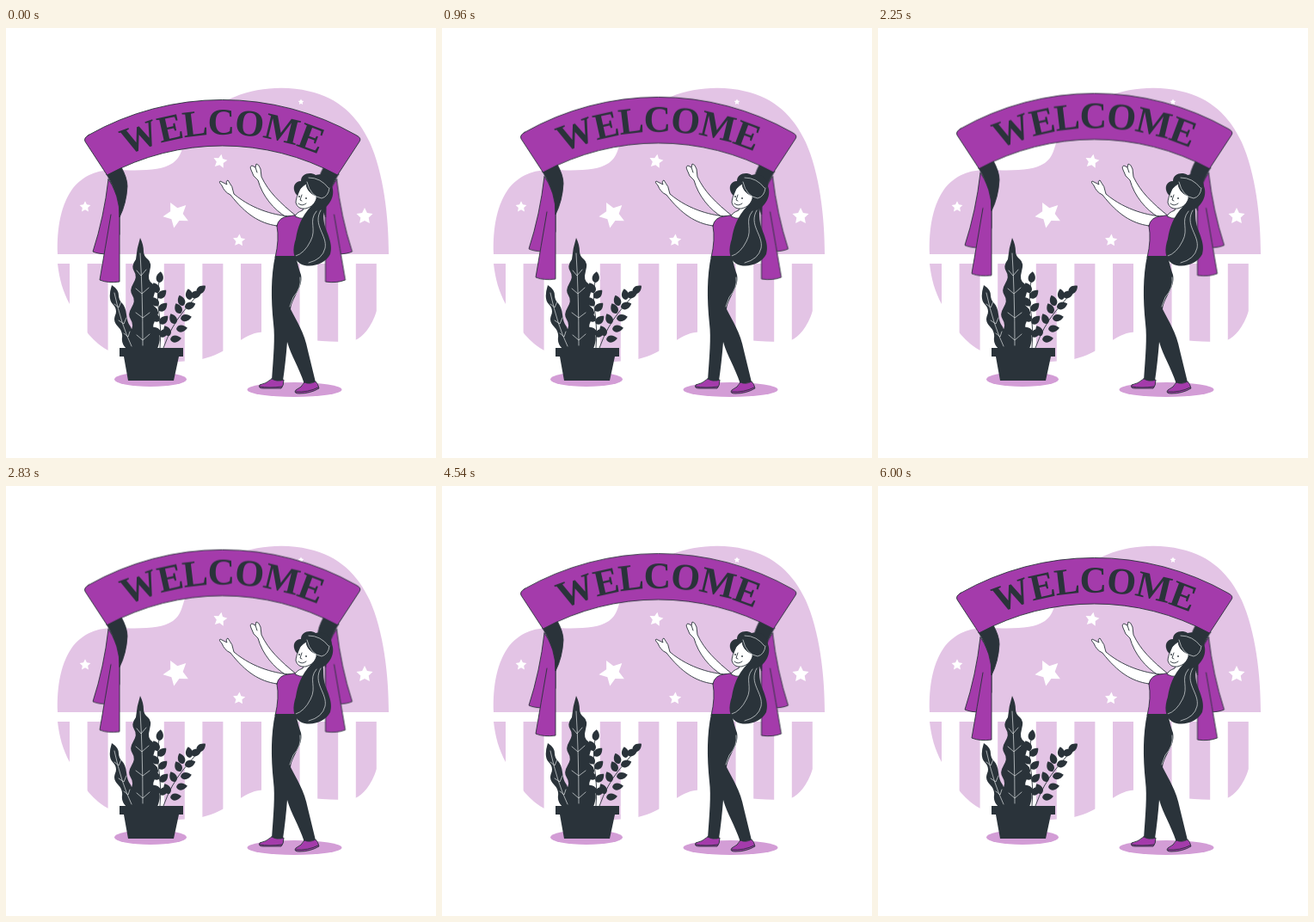
These frames come from a looping animation (500 by 500 pixels, 6.04 s). An HTML page without scripts:

```html
<!DOCTYPE html>
<html lang="en">
<head>
<meta charset="utf-8">
<title>Welcome</title>
<style>
  html, body { margin: 0; width: 100%; height: 100%; overflow: hidden; background: #fff; }
  svg { display: block; width: 100vw; height: 100vh; }
  .pale { fill: #e3c4e5; }
  .shade { fill: #d39dd6; }
  .dark { fill: #2a333a; }
  .plum { fill: #a43bab; }
  .skin { fill: #fff; }
  .ink { stroke: #2a333a; stroke-width: .9; stroke-linejoin: round; stroke-linecap: round; }
  .line { fill: none; }
  .vein { fill: none; stroke: #dfe2e4; stroke-width: .7; stroke-linecap: round; }
  .title { font: bold 43.5px "Liberation Serif", "Times New Roman", serif; letter-spacing: -1.1px; text-anchor: middle; fill: #2a333a; }
  .float { animation: float 6.04s linear infinite; }
  @keyframes float {
    0%, 99.5% { transform: translateY(0); }
    49.7% { transform: translateY(-10px); }
  }
</style>
</head>
<body>
<svg viewBox="0 0 500 500">
  <defs>
    <path id="star" d="M0-10 2.9-4 9.5-3.1 4.7 1.5 5.9 8.1 0 5-5.9 8.1-4.7 1.5-9.5-3.1-2.9-4Z" fill="#fff"/>
    <path id="leaf" class="dark" d="M0 0C-6-2-5-9 0-13C5-9 6-2 0 0Z"/>
    <path id="base" d="M102 169A275 275 0 0 1 404 169"/>
    <clipPath id="low">
      <path d="M60 274C62 292 66 306 74 321C82 338 92 354 107 367C130 387 180 393 228 385C258 378 268 362 289 355C312 350 330 359 348 362C372 365 392 366 406 363C415 359 425 348 431 329V274Z"/>
    </clipPath>
    <g id="drape">
      <path class="plum ink" d="M119 176Q114 220 101 260Q107 263 120 263L132 240V205Q128 188 119 176Z"/>
      <path class="plum ink" d="M122 217Q115 258 109 293Q119 297 132 295V205"/>
      <path class="dark ink" d="M117 170L133 160Q141 174 141 184Q140 204 132 220Q133 196 117 170Z"/>
    </g>
  </defs>

  <!-- backdrop -->
  <path class="pale" d="M60 263C59 232 64 205 78 186C91 171 105 165 127 165C160 166 180 166 194 157C208 147 203 133 216 117C228 101 246 87 266 80C292 69 326 67 352 73.500C387 81 409 103 423 133C439 169 445 219 445 263Z"/>
  <g clip-path="url(#low)">
    <path class="line" d="M50 330H440" stroke="#e3c4e5" stroke-width="130" stroke-dasharray="24 20.6"/>
  </g>
  <use href="#star" transform="translate(198 217)rotate(-26)scale(1.57)"/>
  <use href="#star" transform="translate(249 155)rotate(10)scale(.85)"/>
  <use href="#star" transform="translate(92 208)scale(.67)"/>
  <use href="#star" transform="translate(271 247)rotate(4)scale(.75)"/>
  <use href="#star" transform="translate(417 219)"/>
  <use href="#star" transform="translate(343 86)scale(.36)"/>
  <ellipse class="shade" cx="168" cy="408.5" rx="42" ry="8.5"/>
  <ellipse class="shade" cx="335.5" cy="420.5" rx="55" ry="8.5"/>

  <!-- banner -->
  <g class="float">
    <use href="#drape"/>
    <use href="#drape" transform="translate(503.5)scale(-1 1)"/>
    <path class="plum ink" d="M96 124.500A315 315 0 0 1 407 124.500Q414 128 411 132L385.500 171A281 281 0 0 0 117.500 171L92 132Q90 128 96 124.500Z"/>
    <text class="title"><textPath href="#base" startOffset="49.4%">WELCOME</textPath></text>
  </g>

  <!-- woman -->
  <g>
    <path class="skin ink" d="M338 219C318 203 305 190 297 173L296 164Q294 158 291 158L290 162L286 160Q283 161 285 165Q287 173 293 177C298 195 311 211 326 220Z"/>
    <path class="line ink" d="M290 162L292 168"/>
    <path class="skin ink" d="M330 219C316 218 289 213 265 193Q264 184 258 177Q255 178 257 182L249 178Q247 179 251 183Q254 191 261 194C279 217 295 227 315 230Q325 228 330 219Z"/>
    <path class="plum ink" d="M315 230Q317 220 328 219L346 216Q340 243 338 267H313Q318 246 315 230Z"/>
    <path class="skin ink" d="M347 207L345 212Q337 215 336 219Q348 225 355 216L359 204Z"/>
    <path class="dark" d="M355 207C343 220 339 232 337 245C333 257 333 268 342 274C353 280 371 275 377 263C381 250 372 237 370 227C368 215 371 209 365 202Z"/>
    <path class="dark" d="M337 193C332 185 336 178 343 178C343 169 354 167 360 171C370 168 379 175 379 184C383 194 377 207 367 211L352 207Z"/>
    <path class="skin ink" d="M342 187Q337 198 337 203Q339 211 348 210Q357 208 360 201Q363 195 358 194Q350 190 349 181Q346 183 342 187Z"/>
    <path class="line ink" d="M344 194L342 200L344 201M340 204Q344 208 349 204" stroke-width=".7"/>
    <circle class="dark" cx="341" cy="196" r=".9"/>
    <circle class="dark" cx="349" cy="198" r=".9"/>
    <path class="vein" d="M350 179Q354 196 367 198Q375 196 376 186M352 174Q366 174 375 186M361 213C351 225 362 233 354 248Q347 262 337 265M366 212C356 229 374 241 371 256Q368 269 352 273"/>
    <path class="dark" d="M313 265H337Q340 279 343 287C346 302 333 312 331 327C338 341 347 354 351 375L360 412L347 414C340 393 332 382 327 365Q325 390 322 410H309C311 382 313 360 311 344C308 314 308 289 313 265Z"/>
    <path class="vein" d="M342 290Q344 302 334 313L330 324"/>
    <path class="plum ink" d="M309 408Q302 414 295 415Q293 419 299 419H320Q323 416 323 409Q316 412 309 408Z"/>
    <path class="plum ink" d="M347 412Q344 418 337 421Q334 425 341 425Q354 425 364 419Q363 414 360 411Q353 415 347 412Z"/>
    <path class="line ink" d="M295 417Q306 419 321 417M337 423Q351 424 363 418"/>
  </g>

  <!-- plant -->
  <g>
    <path class="line ink" d="M179 372Q181 350 177 324Q175 307 179 290M183 372Q192 347 206 330L228 304"/>
    <use href="#leaf" transform="translate(178 296)rotate(8)"/>
    <use href="#leaf" transform="translate(177 308)rotate(-25)"/>
    <use href="#leaf" transform="translate(177 314)rotate(45)"/>
    <use href="#leaf" transform="translate(177 323)rotate(-40)"/>
    <use href="#leaf" transform="translate(178 329)rotate(45)"/>
    <use href="#leaf" transform="translate(178 341)rotate(-45)"/>
    <use href="#leaf" transform="translate(179 344)rotate(45)"/>
    <use href="#leaf" transform="translate(179 357)rotate(-45)"/>
    <use href="#leaf" transform="translate(179 359)rotate(45)"/>
    <use href="#leaf" transform="translate(222 308)rotate(50)"/>
    <use href="#leaf" transform="translate(214 316)rotate(-10)"/>
    <use href="#leaf" transform="translate(215 312)rotate(70)"/>
    <use href="#leaf" transform="translate(206 323)rotate(-20)"/>
    <use href="#leaf" transform="translate(208 325)rotate(70)"/>
    <use href="#leaf" transform="translate(203 332)rotate(-25)"/>
    <use href="#leaf" transform="translate(203 338)rotate(80)"/>
    <use href="#leaf" transform="translate(197 344)rotate(-25)"/>
    <use href="#leaf" transform="translate(198 350)rotate(85)"/>
    <use href="#leaf" transform="translate(190 358)rotate(-25)"/>
    <use href="#leaf" transform="translate(191 362)rotate(85)"/>
    <path class="dark" d="M123 299Q131 304 131 311Q131 316 135 320T140 333T144 346T148 359T150 373H140Q134 367 135 360T130 347T127 334T124 321T123 299Z"/>
    <path class="dark" d="M156 244Q160 252 160 260Q160 265 165 269T167 283T170 297T172 311T174 325T174 339T175 353T176 373H145Q141 361 145 353T145 339T146 325T147 311T148 297T149 283T151 269Q152 256 156 244Z"/>
    <path class="vein" d="M156 262Q159 310 159 369M152 282L157 288L163 281M151 303L158 309L166 302M151 331L159 337L167 331M152 357L159 363L167 356M126 308Q134 345 146 370M126 321L131 325L134 318M131 340L137 344L140 337M137 355L142 359L144 353"/>
    <path class="dark" d="M132 372H206V382H201L195 410H142L137 382H132Z"/>
  </g>
</svg>
</body>
</html>
```
